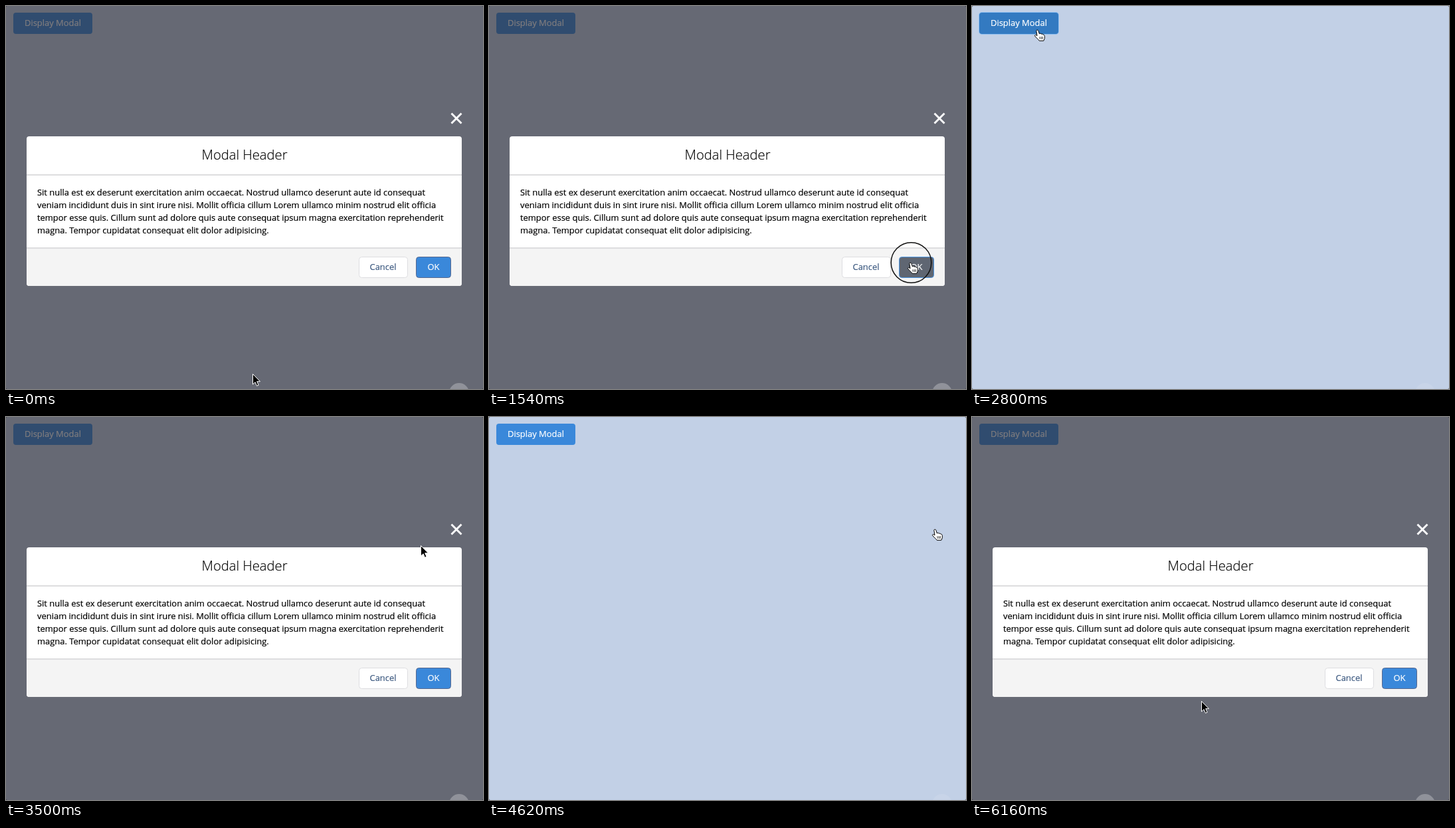
These frames come from a looping animation (718 by 576 pixels, 6.23 s). An HTML page:

```html
<!DOCTYPE html>
<html lang="en">
<head>
<meta charset="utf-8">
<title>Modal demo</title>
<style>
  html, body { margin: 0; width: 100%; height: 100%; overflow: hidden; background: #5c606b; }
  svg { display: block; width: 718px; height: 576px; }
  text { font: 12.95px "Open Sans", "Noto Sans", sans-serif; fill: currentColor; stroke: currentColor; stroke-width: .2px; }
  .title { font-size: 20.2px; font-weight: 300; }
  .mid { text-anchor: middle; }
</style>
</head>
<body>
<svg viewBox="0 0 718 576">
  <rect width="718" height="576" rx="2" fill="#c2d0e6"/>
  <rect id="glow" x="10" y="9" width="121" height="34" rx="5" fill="#8dbdf0"/>
  <rect id="open" x="11" y="10" width="119" height="32" rx="4"/>
  <text class="mid" x="70.500" y="30" color="#fff">Display Modal</text>

  <g id="modal">
    <rect width="718" height="576" fill="#2b2528" opacity=".6"/>
    <path id="close" d="M670.500 161.500l15 15m0-15l-15 15" stroke="#fff" stroke-width="2.900"/>
    <rect x="31" y="196" width="655" height="225" rx="4" fill="#fff"/>
    <path d="M31 364H686V417a4 4 0 0 1-4 4H35a4 4 0 0 1-4-4Z" fill="#f4f4f4"/>
    <path d="M31 254H686M31 364H686" stroke="#dddddf" stroke-width="2"/>
    <text class="title mid" x="359" y="231" color="#080808">Modal Header</text>
    <g color="#000">
      <text x="47" y="285">Sit nulla est ex deserunt exercitation anim occaecat. Nostrud ullamco deserunt aute id consequat</text>
      <text x="47" y="304">veniam incididunt duis in sint irure nisi. Mollit officia cillum Lorem ullamco minim nostrud elit officia</text>
      <text x="47" y="323">tempor esse quis. Cillum sunt ad dolore quis aute consequat ipsum magna exercitation reprehenderit</text>
      <text x="47" y="342">magna. Tempor cupidatat consequat elit dolor adipisicing.</text>
    </g>
    <rect id="cancel" x="531.500" y="377.500" width="73" height="31" rx="4" fill="#fff" stroke="#dddde0"/>
    <text class="mid" x="567.500" y="397" color="#3d5a80">Cancel</text>
    <rect id="ok" x="617.500" y="377.500" width="52" height="31" rx="4"/>
    <text class="mid" x="643.500" y="397" color="#fff">OK</text>
  </g>
  <circle id="dot" cx="682" cy="582" r="15" fill="#fff"/>

  <g id="cursor">
    <circle id="ring" cx=".5" r="30.300" fill="none" stroke="#111" stroke-width="1.500"/>
    <path id="arrow" d="M.5.5v15.500l3.600-3.300 2.400 5.600 2.600-1.100-2.400-5.500h4.800Z" fill="#000" stroke="#fff"/>
    <g id="hand" transform="translate(-.7 .8)" stroke="#000" stroke-linejoin="round">
      <path d="M-1.500.5C-1.500-1 1.200-1.200 1.600.5L3 5C4 4 5.500 4.300 6 5.500 7 4.800 8.200 5.200 8.600 6.300 9.800 6 10.800 7 11 8.500V12L9.500 15.500H3C1 12.500-2 11-3.800 8-4 6.500-2 6-.3 8Z" fill="#fff"/>
      <path d="M3.500 9.500L4 13M5.800 9.300L6.200 13M8 9.300V13" stroke-width=".8"/>
    </g>
  </g>
</svg>
<script>
const LOOP = 6230, STEP = 70;
const [glow, open, modal, close, cancel, ok, dot, cursor, ring, arrow, hand] =
  ['glow', 'open', 'modal', 'close', 'cancel', 'ok', 'dot', 'cursor', 'ring', 'arrow', 'hand']
    .map(id => document.getElementById(id));

// Each move eases out from wherever the pointer is towards a new place.
const start = [371, 553];
const moves = [
  { from: 0, until: 630, to: [560, 397], power: 2 },
  { from: 630, until: 910, to: [635, 386], power: 2 },
  { from: 1680, until: 2310, to: [99, 36], power: 3 },
  { from: 2940, until: 3500, to: [624, 193], power: 2 },
  { from: 3500, until: 4060, to: [672, 169], power: 2 },
  { from: 4620, until: 5390, to: [102, 24], power: 6 },
  { from: 5740, until: 6160, to: [345, 427], power: 1.1 }
];

// Clicks close and open the modal in turn; opening lags the release by one step.
const clicks = [
  { down: 1330, up: 1610 }, { down: 2520, up: 2800 },
  { down: 4270, up: 4550 }, { down: 5530, up: 5670 }
];
const toggles = clicks.map((c, i) => c.up + i % 2 * STEP);

const show = (el, on) => el.style.visibility = on ? '' : 'hidden';

function pointerAt(t) {
  return moves.reduce((pos, { from, until, to, power }) => {
    const k = Math.min(1, Math.max(0, (t - from) / (until - from)));
    const eased = 1 - (1 - k) ** power;
    return pos.map((v, i) => v + (to[i] - v) * eased);
  }, start);
}

function draw(t) {
  const [x, y] = pointerAt(t);
  const over = el => {
    const b = el.getBBox();
    return x >= b.x && x <= b.x + b.width && y >= b.y && y <= b.y + b.height;
  };
  const shown = toggles.filter(time => t >= time).length % 2 === 0;
  const pressed = clicks.some(c => t >= c.down && t < c.up);
  const lastClick = clicks.filter(c => t >= c.down).length;
  const onOpen = !shown && over(open), onOk = over(ok);
  const pointing = [open, cancel, ok, close].some(over);

  show(modal, shown);
  show(glow, onOpen && lastClick % 2 === 0);
  open.setAttribute('fill', onOpen ? '#337ac1' : '#3a88da');
  ok.setAttribute('fill', !onOk ? '#3a88da' : pressed ? '#5f6672' : '#337ac1');
  ok.setAttribute('stroke', onOk ? '#4b94e0' : '#56688f');
  dot.setAttribute('opacity', shown ? .28 : .1);

  show(hand, pointing);
  show(arrow, !pointing);
  show(ring, pressed);
  cursor.setAttribute('transform', `translate(${x} ${y})`);
}

function tick() {
  const t = performance.now() % LOOP;
  draw(Math.floor(t / STEP) * STEP);
  requestAnimationFrame(tick);
}
tick();
</script>
</body>
</html>
```
